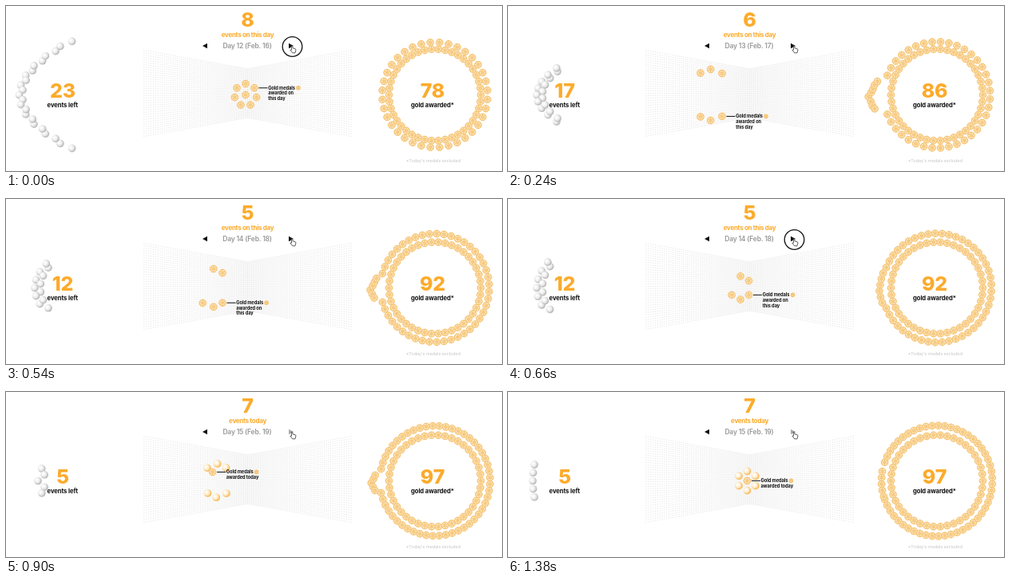
An HTML page with a canvas for the animation above (1440 ms loop, 621 by 207 pixels).

```html
<!DOCTYPE html>
<html lang="en">
<head>
<meta charset="utf-8">
<title>Medal events by day</title>
<style>
  html, body { margin: 0; width: 100%; height: 100%; overflow: hidden; background: #fff; }
  canvas { display: block; width: 621px; height: 207px; }
</style>
</head>
<body>
<canvas></canvas>
<script>
const STEP = 60, STEPS = 24, MID = 111.5, GOLD = '#fbab2c';
const INNER = 42, OUTER = 36;
const canvas = document.querySelector('canvas');
const ctx = canvas.getContext('2d');
const scale = devicePixelRatio || 1;
canvas.width = 621 * scale;
canvas.height = 207 * scale;

// Times are in steps: the label switches at `from`, the day's balls set off at `start`.
const days = [
  { from: 0, start: -99, left: 23, gold: 78, events: 8, date: 'Day 12 (Feb. 16)', label: 1 },
  { from: 1, start: .2, left: 17, gold: 86, events: 6, date: 'Day 13 (Feb. 17)', label: 2 },
  { from: 6, start: 5, left: 12, gold: 92, events: 5, date: 'Day 14 (Feb. 18)', label: 2 },
  { from: 12, start: 10.8, left: 5, gold: 97, events: 7, date: 'Day 15 (Feb. 19)', label: 6, today: true },
];

// Every day takes three balls from the bottom end of the waiting arc, the rest from the top.
let first = -5, last = 25;
days.forEach((day, d) => {
  Object.assign(day, { first, last, leave: days[d + 1]?.start ?? Infinity });
  first += day.events - 3;
  last -= 3;
});

const clamp = v => Math.max(0, Math.min(1, v));
const lerp = (a, b, t) => a + (b - a) * t;
const mix = (p, q, t) => p.map((v, n) => lerp(v, q[n], t));
const polar = (x, y, r, a) => [x + r * Math.cos(a), y + r * Math.sin(a)];
const progress = e => e <= 0 ? 0 : e ** 4 / (e ** 4 + 48);

// Waiting arc over time: step, gap, left edge, zigzag, curvature
const arcs = [
  [0, 6.1, 16.5, 4, .0138],
  [4, 4.2, 36, 7, .022],
  [11, 5.4, 36, 7, .013],
  [15, 7.7, 40, 7, .02],
  [23, 10.2, 31, 0, .005],
];
function waiting(index, t) {
  const n = Math.max(1, arcs.findIndex(arc => t <= arc[0]));
  const a = arcs[n - 1], b = arcs[n];
  const [, gap, x, zigzag, curve] = mix(a, b, clamp((t - a[0]) / (b[0] - a[0])));
  const k = index - 11, dy = k * gap;
  return [x + Math.abs(k % 2) * zigzag + curve * dy * dy, MID + dy];
}

// A day's medals gather in a circle, with a spare one in the middle.
function slot(day, i) {
  const count = Math.max(6, day.events - 1);
  return polar(300, MID, i < count ? count * 2 : 0, (i / count - .25) * 2 * Math.PI);
}

// The outer ring opens on its left side as newcomers squeeze in.
const settled = (day, t) => clamp((t - day.leave - 1) / 6);
const squeezed = (list, t) => list.reduce((sum, day) => sum + day.events * settled(day, t), 0);
function ringPoint(d, i, t) {
  const total = squeezed(days, t);
  const share = d < 0 ? 1 : settled(days[d], t);
  const pair = i >> 1;
  const rank = squeezed(days.slice(d + 1), t) / 2 + (pair + .5) * share;
  const side = i % 2 ? 1 : -1;
  const bulge = (1 - share) * (20 - 4 * pair - 3 * side);
  return polar(537, MID, 66 + total * .18 + bulge, Math.PI + side * rank * 2 * Math.PI / (OUTER + total));
}

function place(d, i, t) {
  const day = days[d];
  const low = i >= 2 && i <= 4;
  const rank = low ? i - 2 : i < 2 ? 1 - i : i - 3;
  const home = waiting(low ? day.last - rank : day.first + rank, Math.min(t, day.start));
  const p = progress(t - day.start - rank * .08);
  let pos = mix(home, slot(day, i), p);
  pos[1] += (low ? 27 : -27) * Math.sin(Math.PI * p ** .6);
  const out = clamp(progress(t - day.leave) / .85);
  return mix(pos, ringPoint(d, i, t), out);
}

function disc(x, y, r, fill) {
  ctx.fillStyle = fill;
  ctx.beginPath();
  ctx.arc(x, y, r, 0, 7);
  ctx.fill();
}

function ball([x, y], edge, shade) {
  const g = ctx.createRadialGradient(x - 1.6, y - 1.4, .5, x - .8, y - .7, 5.8);
  g.addColorStop(0, '#fff');
  g.addColorStop(.5, shade);
  g.addColorStop(1, edge);
  disc(x, y, 4.8, g);
}
const grayBall = p => ball(p, '#adadad', '#ececec');
const goldBall = p => ball(p, '#f5ad3c', '#fdeccb');

function medal([x, y], r = 4.7) {
  disc(x, y, r, '#fce3b6');
  ctx.strokeStyle = '#f2b455';
  ctx.lineWidth = .8;
  ctx.beginPath();
  ctx.arc(x, y, r - .4, 0, 7);
  for (let k = 0; k < 6; k++) {
    const a = k * Math.PI / 3 + .5;
    ctx.moveTo(...polar(x, y, .5, a));
    ctx.lineTo(...polar(x, y, r * .68, a));
  }
  ctx.stroke();
}

function text(str, x, y, size, color, { weight = 700, align = 'center', spacing = 0 } = {}) {
  ctx.font = `${weight} ${size}px Inter, "Liberation Sans", sans-serif`;
  ctx.letterSpacing = spacing + 'px';
  ctx.textAlign = align;
  ctx.fillStyle = color;
  ctx.fillText(str, x, y);
}
const figure = (n, x, y) => text(n, x, y, 25, GOLD, { weight: 800, spacing: -.2 });

function polygon(points, fill) {
  ctx.beginPath();
  points.forEach(([x, y]) => ctx.lineTo(x, y));
  ctx.closePath();
  ctx.fillStyle = fill;
  ctx.fill();
}
const arrow = (x, tip, fill) => polygon([[x + tip, 50], [x, 46.8], [x, 53.2]], fill);

function funnel() {
  ctx.fillStyle = '#e0e0e0';
  for (let k = -57; k <= 57; k++) {
    const d = 168.7 * (Math.exp(.01 * Math.abs(k)) - 1);
    const x = 302.5 + Math.sign(k) * d, half = 30.5 + d * .181;
    for (let row = -18; row <= 18; row++) {
      ctx.fillRect(x - .5, 109 + half * row / 18, 1, 1);
    }
  }
}

function controls(day, clicked) {
  arrow(252, -6, '#111');
  if (clicked) {
    disc(358.5, 51, 12.3, '#fff');
    ctx.strokeStyle = '#111';
    ctx.lineWidth = 1.3;
    ctx.stroke();
  }
  arrow(354, 6, day.today ? '#aaa' : '#111');
  // Pointing hand
  polygon([[357.2, 50.2], [358.7, 50.2], [359.2, 53], [362.2, 53.7], [363, 55],
    [362, 58.8], [358.7, 58.8], [355.9, 55.2], [357.6, 55]], '#fff');
  ctx.strokeStyle = '#333';
  ctx.lineWidth = .8;
  ctx.stroke();
}

function caption([x, y], today) {
  ctx.fillStyle = '#111';
  ctx.fillRect(x + 5.5, y - .5, 11, 1);
  const lines = today ? ['Gold medals', 'awarded today'] : ['Gold medals', 'awarded on', 'this day'];
  lines.forEach((line, n) =>
    text(line, x + 17.2, y + 2 + n * 6.6, 5.7, '#111', { align: 'left', spacing: -.06 }));
  medal([x + 55, y], 2.8);
}

function draw(t) {
  const current = days.findLastIndex(day => t >= day.from), day = days[current];
  ctx.setTransform(scale, 0, 0, scale, 0, 0);
  ctx.fillStyle = '#fff';
  ctx.fillRect(0, 0, 621, 207);
  funnel();

  for (let k = 0; k < INNER; k++) medal(polar(537, MID, 57.5, k * 2 * Math.PI / INNER));
  for (let k = 0; k < OUTER; k++) medal(ringPoint(-1, k, t));
  for (let k = first; k <= last; k++) grayBall(waiting(k, t));
  days.forEach(({ events, label, today }, d) => {
    for (let i = 0; i < events; i++) {
      const drawPiece = d > current ? grayBall : today && i !== label ? goldBall : medal;
      drawPiece(place(d, i, t));
    }
  });
  caption(place(current, day.label, t), day.today);

  figure(day.events, 302.5, 26);
  text(day.today ? 'events today' : 'events on this day', 302.5, 39, 8, GOLD, { spacing: -.3 });
  text(day.date, 302, 53, 8.5, '#999', { weight: 600, spacing: -.2 });
  figure(day.left, 71, 115);
  text('events left', 70.7, 126.5, 7.7, '#111', { spacing: -.1 });
  figure(day.gold, 534, 115);
  text('gold awarded*', 534, 126.5, 7.7, '#111', { spacing: -.1 });
  text("*Today's medals excluded", 535, 196, 5.4, '#c4c4c4', { weight: 400 });
  // The click ring shows on the last step before the label switches.
  controls(day, days.some(({ from }) => from > 0 && t === from - 1));
}

let shown = -1;
function tick(now) {
  const t = Math.floor(now / STEP) % STEPS;
  if (t !== shown) draw(shown = t);
  requestAnimationFrame(tick);
}
tick(performance.now());
</script>
</body>
</html>
```
